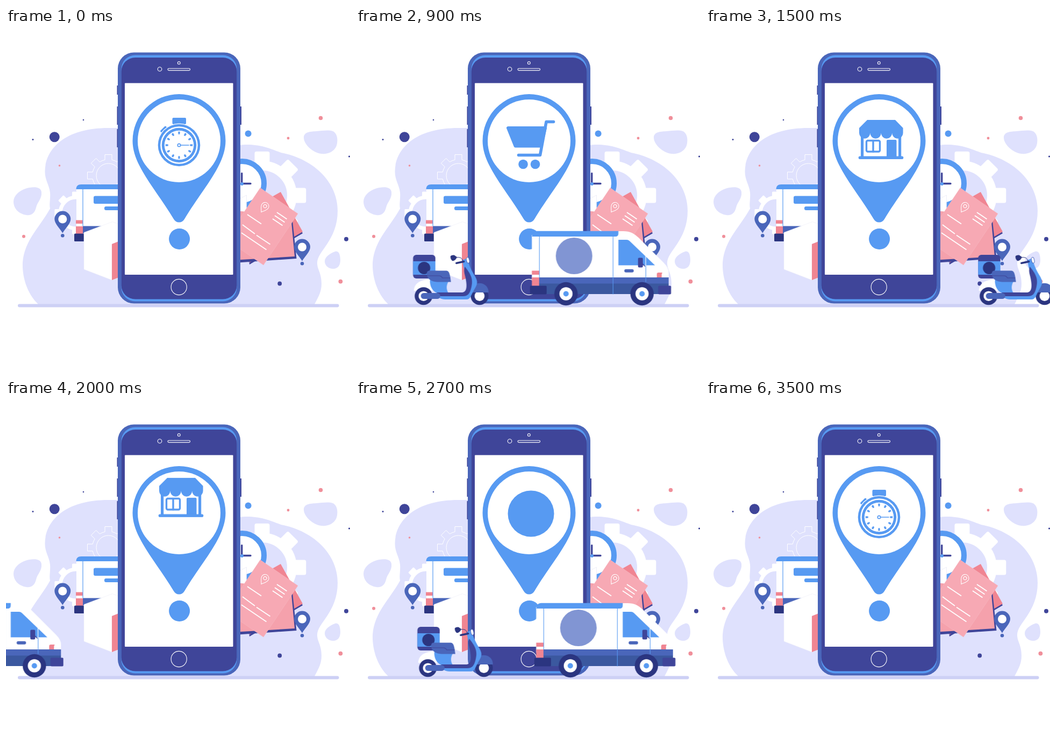
Animation, 640 px wide and 640 px high, one loop 3600 ms. Source, as an HTML page:

```html
<!DOCTYPE html>
<html lang="en">
<head>
<meta charset="utf-8">
<title>Delivery</title>
<style>
  html, body { margin: 0; width: 100%; height: 100%; overflow: hidden; background: #fff; }
  svg { display: block; width: 100vw; height: 100vh; }
  .lilac { fill: #dfe1fd; }
  .steel { fill: #4a66ba; }
  .sky { fill: #579af2; }
  .ink { fill: #3f4599; }
  .navy { fill: #2b3580; }
  .rose { fill: #f08592; }
  .white { fill: #fff; }
  .line { fill: none; stroke: #fff; }
  .skyline { fill: none; stroke: #579af2; stroke-linecap: round; stroke-linejoin: round; }

  #traffic { animation: drive 3600ms linear infinite; }
  #strip { animation: swap 3600ms ease-in-out infinite; }

  /* two passes per loop, the second a little quicker */
  @keyframes drive {
    0% { transform: translateX(-275px); }
    11.111% { transform: translateX(0); }
    16.667% { transform: translateX(128.5px); }
    25% { transform: translateX(320px); }
    41.667% { transform: translateX(720px); }
    47.222% { transform: translateX(850px); }
    49.4% { transform: translateX(905px); }
    49.45% { transform: translateX(-304px); }
    50% { transform: translateX(-300px); }
    63.889% { transform: translateX(51.5px); }
    66.667% { transform: translateX(129.5px); }
    75% { transform: translateX(328px); }
    83.333% { transform: translateX(548px); }
    94.444% { transform: translateX(822px); }
    97.222% { transform: translateX(890px); }
    100% { transform: translateX(960px); }
  }
  @keyframes swap {
    0%, 2.778% { transform: translateY(0); }
    12.778%, 27.778% { transform: translateY(-160px); }
    37.778%, 52.778% { transform: translateY(-320px); }
    62.778%, 75% { transform: translateY(-480px); }
    83.333%, 100% { transform: translateY(-640px); }
  }
</style>
</head>
<body>
<svg viewBox="0 0 640 640">
  <defs>
    <clipPath id="lens"><circle cx="322" cy="210" r="77"/></clipPath>
    <g id="place">
      <path class="steel" d="M0 26C-5 17-15 9-15 0A15 15 0 0 1 15 0C15 9 5 17 0 26Z"/>
      <circle class="white" r="8"/>
      <circle class="steel" cy="30.8" r="3.3"/>
    </g>
    <g id="watch">
      <rect class="sky" x="309.5" y="167" width="25.5" height="12" rx="2"/>
      <rect class="sky" x="-7" y="-5" width="14" height="12" rx="1.5" transform="translate(295 190.500) rotate(-45)"/>
      <circle class="white" cx="322" cy="218" r="40.500"/>
      <circle class="sky" cx="322" cy="218" r="39.300"/>
      <circle class="white" cx="322" cy="218" r="34.800"/>
      <circle class="sky" cx="322" cy="218" r="32.200"/>
      <circle class="white" cx="322" cy="218" r="27.300"/>
      <circle class="skyline" cx="322" cy="218" r="22.700" stroke-width="5" style="stroke-linecap:butt" pathLength="120" stroke-dasharray="2.800 7.200" stroke-dashoffset="1.400"/>
      <path class="skyline" stroke-width="1.600" d="M325 218H340"/>
      <circle class="skyline" cx="322" cy="218" r="2.700" stroke-width="1.700"/>
    </g>
  </defs>

  <path class="lilac" d="M60 514C40 495 30 465 31 437C34 395 62 372 82 336C80 328 83 318 82 306C80 290 72 283 72.500 266C73 225 110 186 190 186H320V514Z"/>
  <path class="lilac" d="M320 514V225H420C430 217 440 217 448 217C475 217 490 224 512 232C570 243 617 285 617 340C617 395 579 415 579 437C579 450 587 455 587 476C587 492 580 502 574 514Z"/>
  <path class="lilac" d="M14 323C14 312 24 303 36 299C48 295 66 294 66 306C67 318 58 324 56 334C53 346 46 349 38 348C24 346 14 336 14 323Z"/>
  <path class="lilac" d="M554 204C554 193 566 193 577 192C590 191 600 189 608 192C617 196 618 210 615 219C610 231 598 235 587 234C570 232 554 216 554 204Z"/>
  <path class="lilac" d="M593 434C593 426 603 419 612 416C620 413 622 424 622 432C622 443 616 448 609 448C600 448 593 442 593 434Z"/>
  <g id="dots"></g>
  <rect x="22" y="513.500" width="597.500" height="6" rx="3" fill="#cdd0f5"/>
  <g id="gears"></g>

  <!-- clock -->
  <circle cx="439" cy="289" r="41" fill="#fff" stroke="#579af2" stroke-width="10"/>
  <path d="M438.700 270.500V289.500H455" fill="none" stroke="#3f4599" stroke-width="3.400" stroke-linecap="round"/>
  <circle class="sky" cx="439" cy="290" r="3"/>
  <path class="white" d="M430 320L447.500 311V380L430 387Z" stroke="#e4e5f3" stroke-width=".6"/>

  <!-- papers -->
  <path class="ink" d="M442 348L512 309L552 382L453 440Z"/>
  <path class="rose" d="M440 345L511 305L552 379L453 436.500Z"/>
  <path class="ink" d="M430 346L533 358L540.500 429L432 436.500Z"/>
  <path d="M428 340L530 350L537 425L430 431.500Z" fill="#f5a1ac"/>
  <path d="M473 297.500L543 345.500L479 441L409 393Z" fill="#f7a9b4" stroke="#f5b9c1" stroke-width=".6"/>
  <path class="line" stroke-width="1.900" d="M449 347L475 364.500M504 343L522.500 355.500M500 349L518.500 361.500M496 355L514.500 367.500M440 366L463 383M466 385.500L491.500 402.500M438 381L484.500 412.500"/>
  <g class="line" transform="translate(482 331.500) rotate(33)" stroke-width="1.100">
    <path d="M0 13C-3 8-7 5-7 0A7 7 0 0 1 7 0C7 5 3 8 0 13Z"/><circle r="3"/>
  </g>

  <!-- parked van tail and parcel -->
  <path class="white" d="M131 296H215V385H131Z"/>
  <path class="sky" d="M130.500 300C130.500 294 134 291 140 291H215V300Z"/>
  <rect class="sky" x="163" y="312.500" width="55" height="14.500" rx="3"/>
  <rect class="sky" x="183" y="332" width="35" height="7" rx="3"/>
  <path class="rose" d="M130 357.500H143V364H130ZM130 369H143V383H130Z"/>
  <path class="steel" d="M143 368.500H215V382H143Z"/>
  <path class="skyline" stroke-width="1.200" d="M143 300V368"/>
  <rect class="navy" x="127" y="382.500" width="20" height="14.500" rx="1.500"/>
  <path class="white" d="M145 380.500L198 360.500L250 380L197 402V469L145 449Z" stroke="#ecedf8" stroke-width=".6"/>
  <path class="rose" d="M197 402L250 381V448L197 469Z"/>

  <use href="#place" x="105.300" y="355.500"/>
  <use href="#place" x="551" y="407.500"/>

  <!-- phone -->
  <path class="ink" d="M206.500 107h4v17h-4zM206.500 146h4v34h-4zM206.500 188h4v34h-4zM434 146h4v34h-4z"/>
  <rect class="steel" x="208" y="45.500" width="228" height="467" rx="30"/>
  <rect class="sky" x="214.500" y="50.500" width="215" height="458" rx="26"/>
  <rect class="ink" x="214.500" y="55" width="215" height="449.500" rx="26"/>
  <rect class="white" x="221" y="102.500" width="201.500" height="356.500" rx="1"/>
  <g class="line" stroke-width="1.100">
    <circle cx="286" cy="76.500" r="3.800"/>
    <rect x="301" y="75.300" width="41.500" height="3.600" rx="1.800"/>
    <circle cx="321.800" cy="64.900" r="2.400"/>
    <circle cx="321.700" cy="482" r="14.600"/>
  </g>
  <path class="sky" d="M235.500 210A86.500 87 0 0 1 408.500 210C408.500 255 366 299 332 355.500Q328.500 361.500 322 361.500Q315.500 361.500 312 355.500C278 299 235.500 255 235.500 210Z"/>
  <circle class="white" cx="322" cy="210" r="77"/>
  <circle class="sky" cx="322.600" cy="392.400" r="19.500"/>

  <!-- icons -->
  <g clip-path="url(#lens)">
    <g id="strip">
      <use href="#watch"/>
      <g transform="translate(0 160)">
        <path class="sky" d="M283 186H352L344 219.500H296.500Z" stroke="#579af2" stroke-width="6" stroke-linejoin="round"/>
        <path class="skyline" stroke-width="5.600" d="M367.500 174.500H354L342.500 236.500H302.500"/>
        <circle class="sky" cx="311" cy="253.500" r="8.800"/><circle class="sky" cx="333.500" cy="253.500" r="8.800"/>
      </g>
      <g transform="translate(0 320)">
        <path class="sky" d="M300 171H352L366.600 186V195.500A10.200 10.200 0 0 1 346.200 195.500A10.200 10.200 0 0 1 325.800 195.500A10.200 10.200 0 0 1 305.400 195.500A10.200 10.200 0 0 1 285 195.500V186Z"/>
        <path class="sky" d="M288 200h5.200v40H288zM358 200h5.200v40H358zM336 240V210Q336 208 338 208H352.500Q354.500 208 354.500 210V240Z"/>
        <rect class="sky" x="283.700" y="238.500" width="83.600" height="5.600" rx="2.800"/>
        <rect class="skyline" x="298.500" y="209.500" width="25" height="20.500" rx="2.500" stroke-width="3.400"/>
        <path class="skyline" stroke-width="3.400" d="M311 210V230"/>
      </g>
      <circle class="sky" cx="325.500" cy="691.500" r="43"/>
      <use href="#watch" y="640"/>
    </g>
  </g>

  <g id="traffic">
    <!-- van -->
    <path class="white" d="M6.500 385H157V378H176C190 378 196 382 205 390L252 437Q261 446 261 455V470H6.500Z"/>
    <path class="sky" d="M7 388C7 381 10 377.700 16 377.700H167.500V382Q167.500 388 162 388Z"/>
    <circle cx="85" cy="424" r="34" fill="#8195d3"/>
    <path class="sky" d="M167.500 394H183Q186 394 188 396L235.500 441.500H167.500Z"/>
    <path class="steel" d="M20 464H261V476H20Z"/>
    <path d="M20 475.500H261V495H20Z" fill="#3b589f"/>
    <path class="skyline" stroke-width="1.100" d="M20.500 388V464M157.500 388V495M218.500 442V472"/>
    <path class="line" stroke-width="1.200" d="M218.300 424V442"/>
    <path d="M211 437L217 443.500" stroke="#3f4599" stroke-width="1.500"/>
    <rect class="ink" x="204" y="427.500" width="9" height="18" rx="2"/>
    <rect class="steel" x="178.500" y="448.700" width="17.500" height="6" rx="3"/>
    <path class="rose" d="M6.500 451.500H20V459H6.500ZM6.500 464H20V480H6.500ZM239 464V458Q239 455 242 455H249V464Z"/>
    <path class="white" d="M248 464V459Q248 455 252 455H261V464Z"/>
    <rect class="navy" x="3" y="479.500" width="31" height="16" rx="2"/>
    <rect class="ink" x="241.500" y="479.500" width="24" height="16" rx="2"/>
    <g id="wheel">
      <circle class="navy" cx="70" cy="494.500" r="21.700"/>
      <circle class="white" cx="70" cy="494.500" r="12.200"/>
      <circle class="sky" cx="70" cy="494.500" r="5"/>
    </g>
    <use href="#wheel" x="141.500"/>

    <!-- scooter -->
    <g transform="translate(-320 0)">
      <path class="white" d="M107 489C107 475 120 467 139 468L142 489Z"/>
      <g id="tyre">
        <circle class="navy" cx="125" cy="498.700" r="16.500"/>
        <circle class="white" cx="125" cy="498.700" r="9.300"/>
      </g>
      <use href="#tyre" x="104.200"/>
      <path class="steel" d="M212 492C212 469 246 469 246 492Z"/>
      <path class="sky" d="M137 468H174C167 476 166 486 172 494H152C141 490 136 480 137 468Z"/>
      <path class="sky" d="M197 432L207 428C209 440 212 447 219 459C228 473 225 477 218 489C213 498 212 505 205 505H165C157 505 152 501 150 497H200C210 488 214 470 200 447Z"/>
      <path class="ink" d="M202 444C212 457 218 466 214 482C211 495 207 499 198 499H150V492H196C205 492 206 482 204 470C203 460 198 453 202 444Z"/>
      <rect class="steel" x="120" y="493" width="36" height="11" rx="5.500"/>
      <rect class="ink" x="105.500" y="422" width="41.500" height="44" rx="6"/>
      <path class="sky" d="M105.500 434H147V459H105.500Z"/>
      <circle class="navy" cx="126" cy="446.500" r="11.500"/>
      <path class="steel" d="M136 451.500H167C173 451.500 174 458 176 472.500H150C139 472 131 466 131 457Q131 451.500 136 451.500Z"/>
      <path d="M131 461H154Q158 461 160 465H175" fill="none" stroke="#3f4599" stroke-width="1.200"/>
      <path class="navy" d="M175 425Q176 422 182 422.500L187 426Q185 433 179 433.500Q175 431 175 425Z"/>
      <path d="M186 427Q196 425 198 433" fill="none" stroke="#2b3580" stroke-width="1"/>
      <path d="M186 437.500L200 434.500" stroke="#2b3580" stroke-width="3.400" stroke-linecap="round"/>
      <ellipse cx="207.500" cy="432" rx="2.600" ry="5.500" transform="rotate(-12 207.500 432)" fill="#fff" stroke="#4a66ba" stroke-width="1"/>
    </g>
  </g>
</svg>
<script>
  const add = (id, markup) => document.getElementById(id).insertAdjacentHTML('beforeend', markup);

  const dots = {
    '#3f4599': [[90.2, 202.8, 9.5], [50, 207.5, 1.5], [144, 171, 1.3], [638.5, 239, 1.6], [633, 392.8, 4], [509.2, 475.5, 3.9]],
    '#579af2': [[450.6, 196.4, 6]],
    '#f08f9a': [[585.5, 167.5, 3.8], [525, 205, 2.4], [99.5, 256, 1.8], [33, 387.8, 3], [622.4, 471.6, 3.9]]
  };
  for (const [fill, list] of Object.entries(dots))
    for (const [x, y, r] of list) add('dots', `<circle cx="${x}" cy="${y}" r="${r}" fill="${fill}"/>`);

  // Eight teeth of width w reaching from radius r out to R, around a round hole.
  function gear(cx, cy, r, R, w, hole, style) {
    const at = (rad, a) => `${(cx + rad * Math.cos(a)).toFixed(2)} ${(cy + rad * Math.sin(a)).toFixed(2)}`;
    const inner = Math.asin(w / 2 / r), outer = Math.asin(w / 2 / R);
    let d = '';
    for (let i = 0; i < 8; i++) {
      const a = i * Math.PI / 4;
      d += i ? `A${r} ${r} 0 0 1 ${at(r, a - inner)}` : `M${at(r, -inner)}`;
      d += `L${at(R, a - outer)}L${at(R, a + outer)}L${at(r, a + inner)}`;
    }
    d += `A${r} ${r} 0 0 1 ${at(r, -inner)}Z`;
    d += `M${cx - hole} ${cy}a${hole} ${hole} 0 1 0 ${2 * hole} 0a${hole} ${hole} 0 1 0 ${-2 * hole} 0Z`;
    add('gears', `<path d="${d}" fill-rule="evenodd" stroke="#fff" stroke-linejoin="round" ${style}/>`);
  }
  gear(190.5, 274.5, 30, 39.5, 13, 22.5, 'fill="none" stroke-width="1"');
  gear(130, 344, 31, 38.5, 11, 27, 'fill="#fff" stroke-width="3"');
  gear(476.5, 311.5, 61, 79, 21, 50, 'fill="#fff" stroke-width="7"');
</script>
</body>
</html>
```
